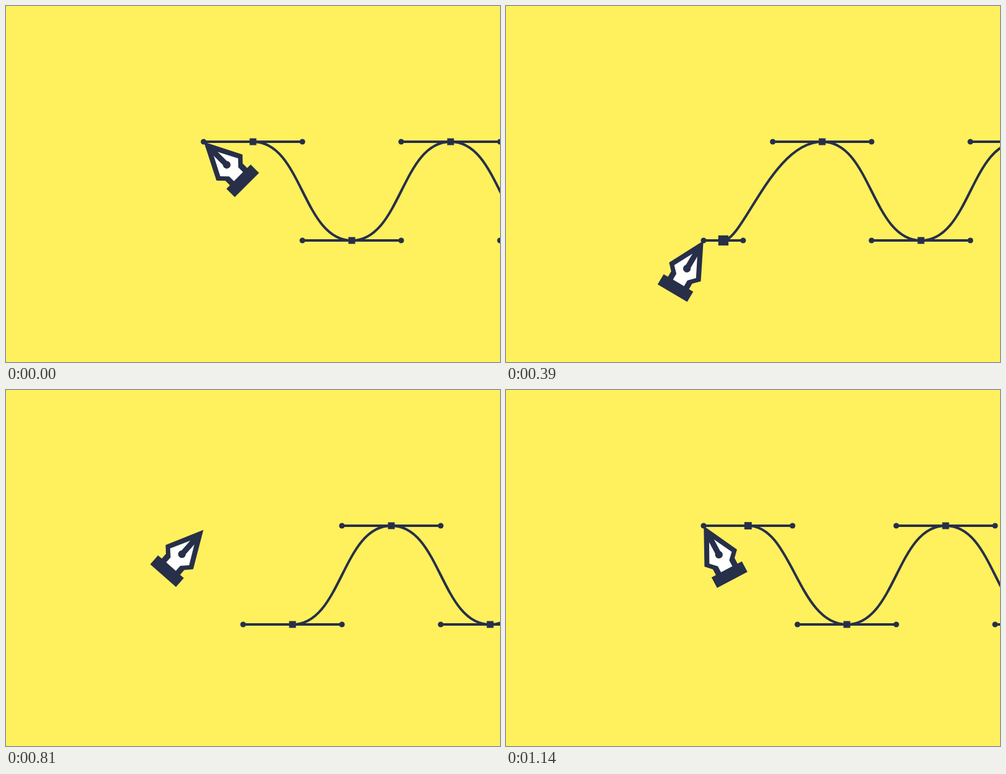
Write an HTML page with a canvas that moves like this. It is 800 px wide and 577 px high and loops after 1.17 s.

```html
<!DOCTYPE html>
<html lang="en">
<head>
<meta charset="utf-8">
<title>Pen wave</title>
<style>
  html, body { margin: 0; width: 100%; height: 100%; overflow: hidden; background: #fff05d; }
  canvas { display: block; }
</style>
</head>
<body>
<canvas id="stage" width="800" height="577"></canvas>
<script>
const ctx = document.getElementById('stage').getContext('2d');
const WIDTH = 800, HEIGHT = 577;
const YELLOW = '#fff05d', INK = '#272f49';
const TOP = 220, BOTTOM = 380, PEN_X = 320;
const STEP_MS = 30, STEPS = 39;
const SPEED = 8;   // pixels per phase unit
const GROW = 10;   // phase units a handle needs to reach full length
const HALF = 20;   // phase units between two anchors

function polygon(points, color) {
  ctx.beginPath();
  points.forEach(([x, y]) => ctx.lineTo(x, y));
  ctx.closePath();
  ctx.fillStyle = color;
  ctx.fill();
}

function dot(x, y, r) {
  ctx.beginPath();
  ctx.arc(x, y, r, 0, Math.PI * 2);
  ctx.fillStyle = INK;
  ctx.fill();
}

function line(x1, y1, x2, y2, width) {
  ctx.beginPath();
  ctx.moveTo(x1, y1);
  ctx.lineTo(x2, y2);
  ctx.lineWidth = width;
  ctx.stroke();
}

// Right-hand outline plus its reflection on the pen axis.
function mirrored(side) {
  return [...side, ...side.map(([x, y]) => [-x, y]).reverse()];
}

const NIB = mirrored([[0, 0.5], [29.8, 59.3], [19.8, 69.7], [19.8, 81]]);
const FACE = mirrored([[0, 19], [20.5, 58.7], [10.4, 69], [10.4, 80]]);
const COLLAR = mirrored([[27.8, 80], [27.8, 99.2]]);

// The first descent takes nine steps instead of ten.
function phaseAt(step) {
  return step < 9 ? step * 10 / 9 : step + 1;
}

function anchorsAt(phase) {
  const list = [];
  let born = Math.floor((phase - GROW) / HALF) * HALF + GROW;
  for (; phase - born <= 90; born -= HALF) {
    const age = phase - born;
    const growth = Math.min(age, GROW);
    const low = (born - GROW) % (2 * HALF) === 0;
    list.push({
      x: PEN_X + SPEED * age,
      y: low ? BOTTOM : TOP,
      reach: SPEED * growth,
      size: 20 - 0.9 * growth,
      extra: 0.625 * (GROW - growth)
    });
  }
  return list;
}

function drawWave(phase) {
  const anchors = anchorsAt(phase);
  ctx.strokeStyle = INK;
  ctx.lineWidth = 4;
  ctx.beginPath();
  ctx.moveTo(anchors[0].x, anchors[0].y);
  for (let i = 1; i < anchors.length; i++) {
    const a = anchors[i - 1], b = anchors[i];
    ctx.bezierCurveTo(a.x + a.reach, a.y, b.x - b.reach, b.y, b.x, b.y);
  }
  ctx.stroke();

  for (const { x, y, reach, size, extra } of anchors) {
    line(x - reach, y, x + reach + extra, y, 4);
    dot(x - reach, y, 4.6);
    dot(x + reach, y, 4.6);
    ctx.fillRect(x - size / 2, y - size / 2, size, size);
  }
}

function penPose(phase) {
  const from = phase < HALF ? TOP : BOTTOM;
  const to = TOP + BOTTOM - from;
  const u = (phase % HALF) / GROW;
  if (u < 1) {
    const eased = 1 - (1 - u) ** 2;
    return { y: from + (to - from) * eased, angle: -45 + 90 * eased };
  }
  return { y: to, angle: 45 - 90 * (u - 1) ** 2 };
}

function drawPen(phase) {
  const { y, angle } = penPose(phase);
  ctx.save();
  ctx.translate(PEN_X, y);
  ctx.rotate(angle * Math.PI / 180);
  polygon(NIB, INK);
  polygon(FACE, '#fff');
  line(0, 10, 0, 53, 9);
  dot(0, 53, 6.2);
  polygon(COLLAR, INK);
  ctx.restore();
}

function draw() {
  const step = Math.floor(performance.now() / STEP_MS) % STEPS;
  const phase = phaseAt(step) % (2 * HALF);
  ctx.fillStyle = YELLOW;
  ctx.fillRect(0, 0, WIDTH, HEIGHT);
  drawWave(phase);
  drawPen(phase);
  requestAnimationFrame(draw);
}

draw();
</script>
</body>
</html>
```
